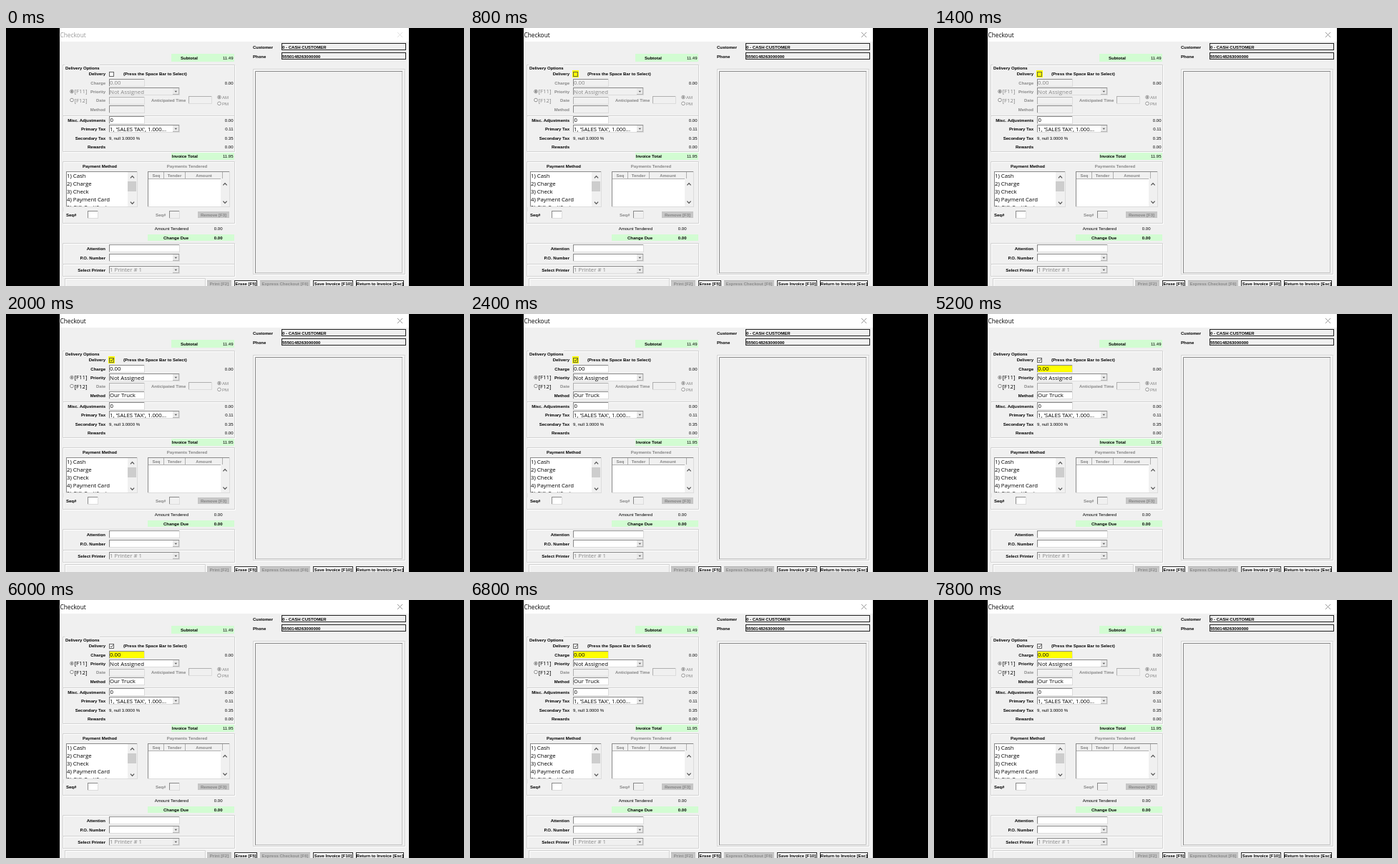
Animation of 640x360 px, one loop 8 s. Source, as an HTML page:

```html
<!DOCTYPE html>
<html lang="en">
<head>
<meta charset="utf-8">
<title>Checkout</title>
<style>
html, body { margin: 0; width: 100%; height: 100%; overflow: hidden; background: #000; }
svg { display: block; width: 640px; height: 360px; }
text { font: 6px "Liberation Sans", Arial, sans-serif; white-space: pre; }
.b { font-weight: bold; }
.u { font: 7.8px "Open Sans", "Noto Sans", sans-serif; }
.title { font-size: 8.3px; }
</style>
</head>
<body>
<svg id="stage" viewBox="0 0 640 360"></svg>
<script>
const stage = document.getElementById('stage');
const GREY = '#868686', FACE = '#f0f0f0', GREEN = '#d2fcd2', YELLOW = '#ffff00';

function add(tag, attrs, content = '') {
  const el = document.createElementNS('http://www.w3.org/2000/svg', tag);
  for (const key in attrs) el.setAttribute(key, attrs[key]);
  el.textContent = content;
  return stage.appendChild(el);
}
const rect = (x, y, width, height, fill) => add('rect', { x, y, width, height, fill });
const path = (d, stroke = '#000', width = 1) =>
  add('path', { d, stroke, 'stroke-width': width, fill: 'none' });
const text = (x, y, str, cls = 'b', fill = '#000', anchor = 'start') =>
  add('text', { x, y, class: cls, fill, 'text-anchor': anchor }, str);
const label = (y, str, fill) => text(139, y, str, 'b', fill, 'end');
const amount = (y, str, x = 317.5) => text(x, y, str, '', '#000', 'end');
const chevron = (x, y, dir, color = '#505050') =>
  path(`M${x - 2.6} ${y + 1.4 * dir}L${x} ${y - 1.4 * dir}L${x + 2.6} ${y + 1.4 * dir}`, color, 1.2);

// Sunken box; returns its inner fill
function field(x, y, w, h, fill = '#fff', edge = '#8a8a8a') {
  rect(x, y, w, h, '#dcdcdc');
  rect(x, y, w - 1, h - 1, edge);
  return rect(x + 1, y + 1, w - 2, h - 2, fill);
}
function combo(x, y, w, h, fill) {
  const box = field(x, y, w, h, fill);
  rect(x + w - 10, y + 1, 9, h - 2, '#b4b4b4');
  rect(x + w - 10, y + 1, 8, h - 3, '#e9e9e9');
  add('path', { d: `M${x + w - 7.5} ${y + h / 2 - .8}h3.6l-1.8 2z`, fill: '#555' });
  return box;
}
function frame(x, y, w, h) {
  path(`M${x + 1.5} ${y + 1.5}h${w}v${h}h${-w}z`, '#fff');
  path(`M${x + .5} ${y + .5}h${w}v${h}h${-w}z`, '#d2d2d2');
}
function radio(x, y, on, color) {
  const ring = add('circle', { cx: x, cy: y, r: 2.3, fill: '#fff', stroke: color, 'stroke-width': .8 });
  if (on) add('circle', { cx: x, cy: y, r: 1.2, fill: color });
  return ring;
}
function button(x, w, str, on) {
  rect(x, 352, w, 8, on ? '#303030' : '#b5b5b5');
  rect(x + (on ? 1 : 0), 353, w - (on ? 2 : 0), 7, on ? '#f4f4f4' : '#c6c6c6');
  text(x + w / 2, 359, str, 'b', on ? '#000' : '#8a8a8a', 'middle');
}

// Window
rect(75, 0, 488, 360, FACE);
rect(75, 0, 488, 19, '#fff');
const title = text(75.5, 13, 'Checkout', 'u title');
const cross = path('M547 6l7 7M554 6l-7 7', '#999', .9);

// Section frames
frame(79, 51, 240, 71);
frame(79, 122, 240, 50);
frame(79, 186, 240, 86);
frame(79, 300, 240, 29);
frame(79, 329, 240, 17);
frame(82, 349, 196, 20);

// Totals
rect(231, 36, 88, 11, GREEN);
text(268, 44, 'Subtotal', 'b', '#000', 'end');
amount(44, '11.49');
rect(231, 174, 88, 10, GREEN);
text(268, 181, 'Invoice Total', 'b', '#000', 'end');
amount(181, '11.95');

// Delivery options
rect(82, 51, 49, 6, FACE);
text(83, 58, 'Delivery Options');
label(66, 'Delivery');
const mark = rect(143, 59, 9, 10, YELLOW);
const box = add('rect', { x: 144.5, y: 61.5, width: 6, height: 6, fill: '#fff', stroke: '#555', 'stroke-width': .9 });
const tick = path('M145.8 64.3l1.5 1.6l2.5-3.4', '#333', .9);
text(164, 66, '(Press the Space Bar to Select)');

const charge = field(144, 71, 50, 11, FACE);
const priority = combo(144, 83, 99, 11, FACE);
field(144, 96, 50, 11, FACE, '#b0b0b0');
const method = field(144, 108, 50, 11, FACE);
field(255, 95, 33, 11, FACE, '#b0b0b0');
label(103, 'Date', GREY);
text(203, 103, 'Anticipated Time', 'b', GREY);
radio(298, 96.5, true, '#808080');
radio(298, 105.3, false, '#808080');
text(302, 99, 'AM', '', GREY);
text(302, 107.5, 'PM', '', GREY);
radio(92, 88.5, true, '#707070');
radio(92, 100.5, false, '#707070');
const enabledText = [
  label(79, 'Charge'), label(91, 'Priority'), label(116, 'Method'),
  text(95.5, 91.3, '[F11]', 'u'), text(95.5, 103.5, '[F12]', 'u'),
  text(145, 79.3, '0.00', 'u'), text(145, 91.6, 'Not Assigned', 'u')
];
const truck = text(145, 116.4, 'Our Truck', 'u');
amount(79, '0.00');

// Taxes
label(131, 'Misc. Adjustments');
field(144, 123, 50, 11);
text(145.5, 131.3, '0', 'u');
label(143, 'Primary Tax');
combo(144, 135, 99, 11);
text(145, 143.6, "1, 'SALES TAX', 1.000...", 'u');
label(156, 'Secondary Tax');
text(144, 156, '9, null 3.0000 %', '');
label(168, 'Rewards');
[[131, '0.00'], [143, '0.11'], [156, '0.35'], [168, '0.00']].forEach(([y, s]) => amount(y, s));

// Payment method list
text(131, 195, 'Payment Method', 'b', '#000', 'middle');
field(84, 200, 100, 50);
['Cash', 'Charge', 'Check', 'Payment Card', 'Gift Certificate'].forEach((name, i) =>
  text(85, 209.3 + i * 11, `${i + 1}) ${name}`, 'u'));
rect(80, 250, 108, 6, FACE);
path('M84 249.5h100', '#dcdcdc');
rect(170, 201, 13, 48, FACE);
rect(170, 214, 12, 14, '#cdcdcd');
chevron(176.5, 208, 1);
chevron(176.5, 244, -1);
text(84, 263, 'Seq#');
field(114, 255, 15, 11);

// Tendered payments
text(253, 195, 'Payments Tendered', 'b', GREY, 'middle');
field(198, 200, 115, 50);
rect(199, 201, 113, 10, FACE);
rect(300, 211, 12, 38, FACE);
path('M199 210.5h101M220.5 201v9M250.5 201v9M302.5 201v9', '#b0b0b0');
[[210, 'Seq'], [235.5, 'Tender'], [276.5, 'Amount']].forEach(([x, s]) =>
  text(x, 208, s, 'b', GREY, 'middle'));
chevron(306, 218, 1);
chevron(306, 243, -1);
text(209, 263, 'Seq#', 'b', GREY);
field(228, 255, 15, 11, FACE);
rect(268, 256, 44, 9, '#c6c6c6');
text(290, 263, 'Remove [F3]', 'b', '#858585', 'middle');

text(255, 282.3, 'Amount Tendered', '', '#000', 'end');
amount(282.3, '0.00', 302.5);
rect(198, 288, 121, 9, GREEN);
text(255, 295, 'Change Due', 'b', '#000', 'end');
text(302.5, 295, '0.00', 'b', '#000', 'end');

// Order details
label(310, 'Attention');
field(144, 302, 99, 11);
label(322.5, 'P.O. Number');
combo(144, 315, 99, 11);
label(340, 'Select Printer');
combo(144, 332, 99, 11, FACE);
text(145, 340.4, '1 Printer # 1', 'u', GREY);

// Customer pane
[[21, 'Customer', '0 - CASH CUSTOMER'], [34, 'Phone', '5550148263000000']].forEach(([y, name, value]) => {
  text(345, y + 7.5, name);
  rect(385, y, 174, 10, '#222');
  rect(386, y + 1, 172, 8, FACE);
  text(386, y + 7.5, value);
});
frame(345, 57, 212, 286);
path('M348.5 342V60.5H554', '#8c8c8c');
path('M349 341.5H553.5V61', '#c4c4c4');

// Commands
button(281, 34, 'Print [F2]', false);
button(319, 32, 'Erase [F5]', true);
button(355, 70, 'Express Checkout [F6]', false);
button(429, 56, 'Save Invoice [F10]', true);
button(489, 67, 'Return to Invoice [Esc]', true);

const fill = (el, color) => el.setAttribute('fill', color);
const show = (el, on) => el.setAttribute('visibility', on ? 'visible' : 'hidden');

function render(now) {
  const t = now % 8000;
  const active = t >= 600, delivery = t >= 2000, onCharge = t >= 4400;
  const onBox = active && !onCharge;
  fill(title, active ? '#000' : '#999');
  cross.setAttribute('stroke', active ? '#8c8c8c' : '#dedede');
  show(mark, onBox);
  fill(box, onBox ? YELLOW : '#fff');
  show(tick, delivery);
  show(truck, delivery);
  enabledText.forEach(el => fill(el, delivery ? '#000' : GREY));
  [priority, method].forEach(el => fill(el, delivery ? '#fff' : FACE));
  fill(charge, onCharge ? YELLOW : delivery ? '#fff' : FACE);
  requestAnimationFrame(render);
}
render(0);
</script>
</body>
</html>
```
